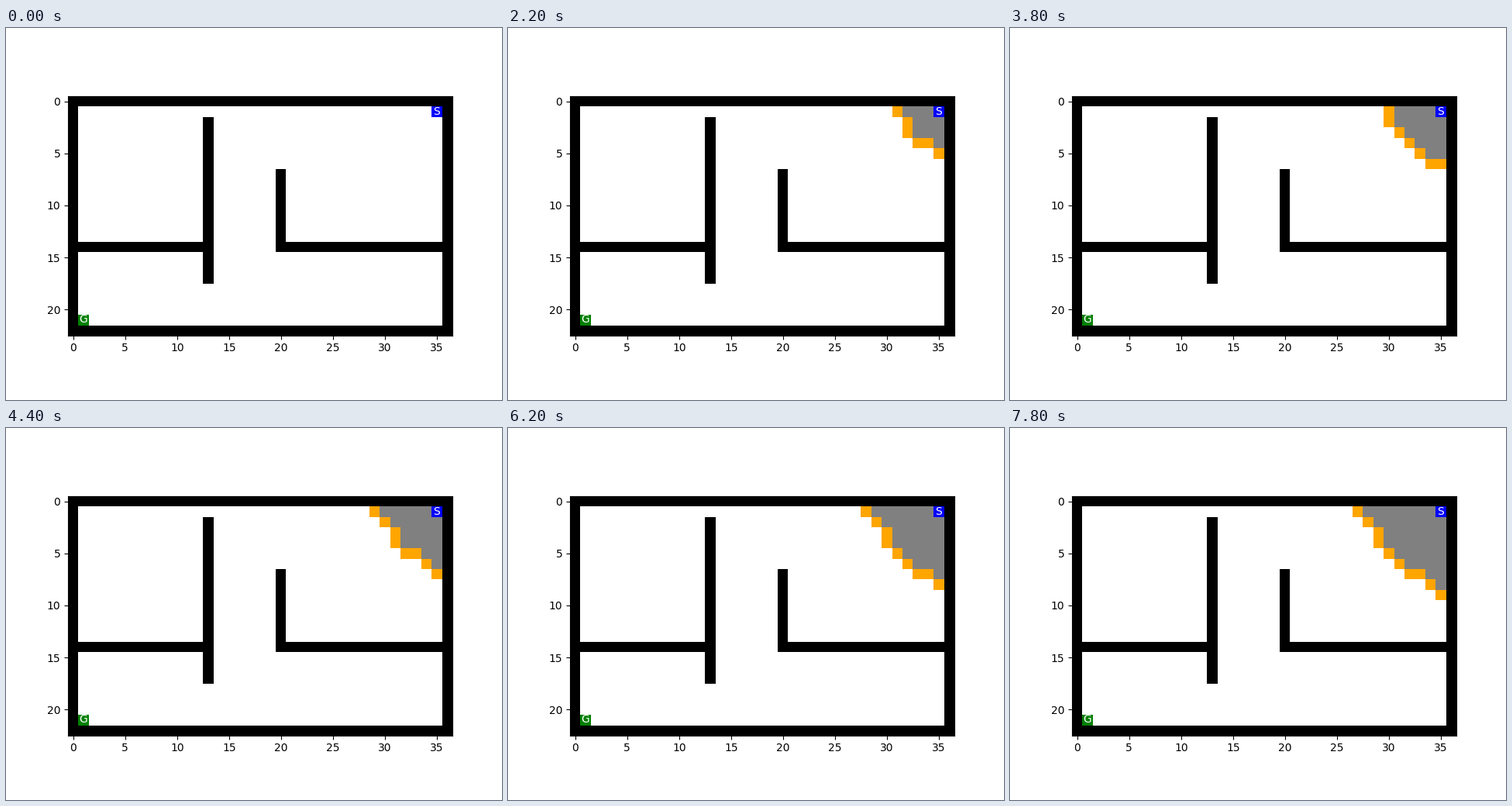
A matplotlib script for the animation above (8000 ms loop, 640 px wide and 480 px high).

```python
import math

import matplotlib.pyplot as plt
import numpy as np
from matplotlib.animation import FuncAnimation
from matplotlib.colors import to_rgb

COLS, ROWS = 37, 23
START, GOAL = (35, 1), (1, 21)
FRAMES, INTERVAL = 40, 200


def build_walls():
    walls = np.zeros((ROWS, COLS), bool)
    walls[[0, -1], :] = True
    walls[:, [0, -1]] = True
    walls[2:18, 13] = True
    walls[14, :14] = True
    walls[7:15, 20] = True
    walls[14, 20:] = True
    return walls


def search_order(walls, count):
    """Expand cells by path cost, then by straight distance from the start."""
    def entry(cost, cell):
        dist = math.dist(cell, START)
        return cost, dist, -cell[0], cell

    frontier, seen, steps = [entry(0, START)], {START}, []
    while frontier and len(steps) < count:
        best = min(frontier)
        frontier.remove(best)
        cost, _, _, (x, y) = best
        fresh = []
        for cell in ((x - 1, y), (x, y + 1), (x + 1, y), (x, y - 1)):
            if cell not in seen and not walls[cell[1], cell[0]]:
                seen.add(cell)
                fresh.append(cell)
                frontier.append(entry(cost + 1, cell))
        steps.append(((x, y), fresh))
    return steps


def paint(img, cell, color):
    img[cell[1], cell[0]] = to_rgb(color)


walls = build_walls()
steps = search_order(walls, FRAMES - 1)
base = np.ones((ROWS, COLS, 3))
base[walls] = 0


def grid_at(n):
    img = base.copy()
    for cell, fresh in steps[:n]:
        paint(img, cell, "gray")
        for new in fresh:
            paint(img, new, "orange")
    paint(img, START, "blue")
    paint(img, GOAL, "green")
    return img


fig, ax = plt.subplots(figsize=(6.4, 4.8), dpi=100)
view = ax.imshow(grid_at(0))
for label, cell in (("S", START), ("G", GOAL)):
    ax.text(*cell, label, color="white", ha="center", va="center")


def update(n):
    view.set_data(grid_at(n))
    return [view]


anim = FuncAnimation(fig, update, frames=FRAMES, interval=INTERVAL,
                     repeat=True, repeat_delay=0)
plt.show()
```
